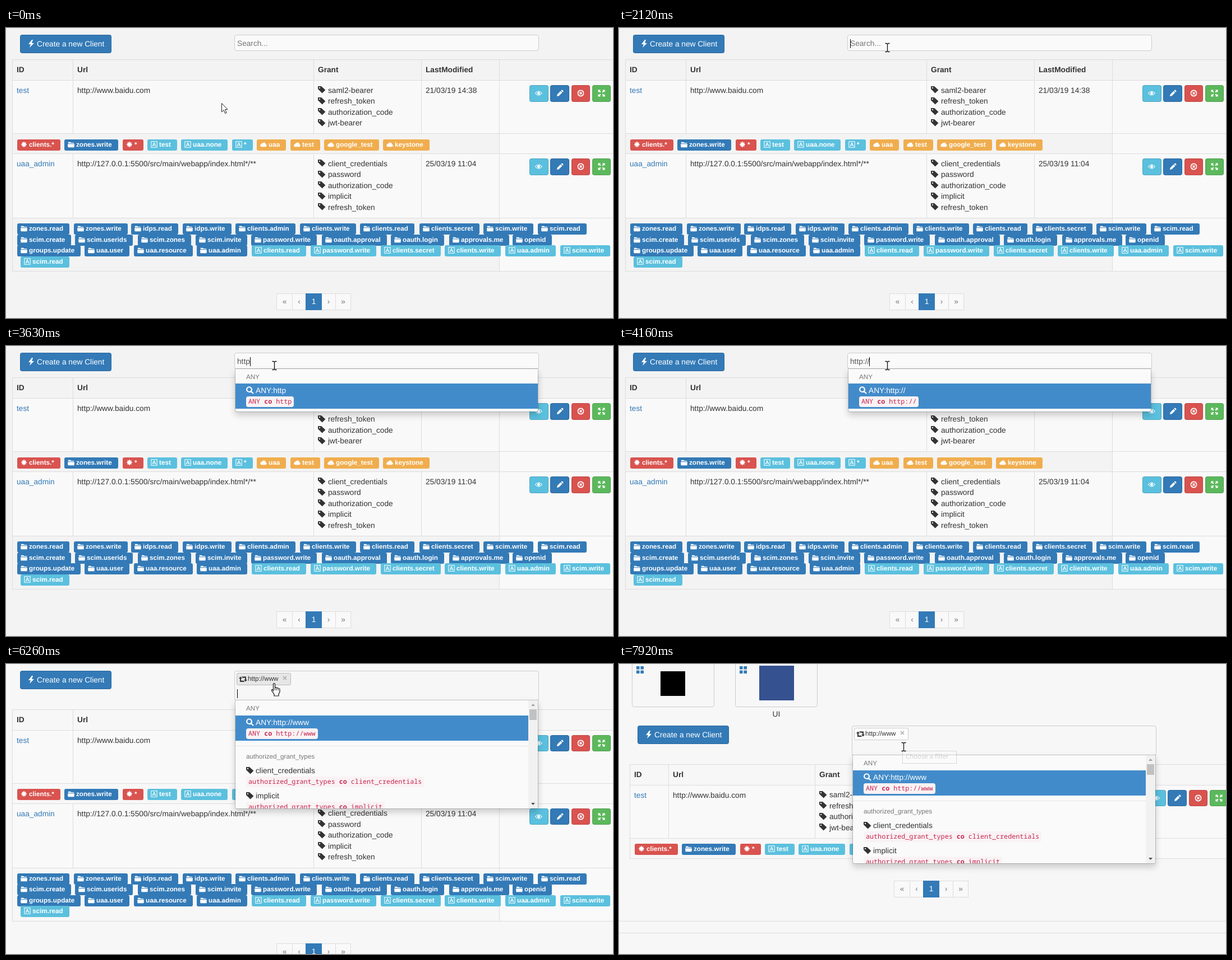
An HTML page for the animation above (8000 ms loop, 1082 by 518 pixels).

```html
<!DOCTYPE html>
<html lang="en">
<head>
<meta charset="utf-8">
<title>Client list search</title>
<style>
html, body { margin: 0; width: 100%; height: 100%; overflow: hidden; }
body { font: 13.7px/20px "Liberation Sans", Arial, sans-serif; color: #333; text-rendering: geometricPrecision; }
div, svg { box-sizing: border-box; }
#stage { position: relative; width: 1082px; height: 518px; overflow: hidden; background: #f3f3f3; }
#stage.chosen { background: #f7f7f7; }
#page { position: absolute; left: 0; top: 0; width: 1082px; height: 518px; --dy: 0px; }
.chosen #page { --dy: 24.5px; }
.filtered #page { left: 8px; top: 98px; }
#lower { left: 0; top: var(--dy); }
#page div, #extras, #extras div, #tip, #cursor { position: absolute; white-space: pre; }
svg { position: absolute; overflow: visible; }
.link { color: #337ab7; }
.cell { border: solid #ddd; border-width: 1px 0 0 1px; }
.odd { background: #f9f9f9; }
.btn { border-radius: 4px; border: 1px solid rgba(0, 0, 0, .13); color: #fff; }
#create { left: 25px; top: 12px; width: 163px; height: 33px; }
.label { height: 20px; line-height: 19px; padding: 0 11px 0 21px; border-radius: 3px; color: #fff; font-size: 11.7px; font-weight: bold; }
.primary { background: #337ab7; }
.info { background: #5bc0de; }
.danger { background: #d9534f; }
.warning { background: #f0ad4e; }
.success { background: #5cb85c; }
.pg { line-height: 28px; text-align: center; border: 1px solid #ddd; background: #f9f9f9; color: #777; }
.pg.on { z-index: 1; background: #337ab7; border-color: #337ab7; color: #fff; }
#search { left: 407px; top: 12px; width: 543px; height: calc(29px + var(--dy)); border: 1px solid #ccc; border-radius: 4px; background: #fafafa; color: #555; }
.chosen #search { background: #f7f7f7; }
#query { left: 4px; top: calc(5px + var(--dy)); height: 20px; }
#hint { left: 4px; top: 5px; color: #777; }
#caret { position: absolute; top: 2px; width: 1px; height: 16px; background: #000; }
#chip { left: 3px; top: 3px; width: 97px; height: 22px; border: 1px solid #bbb; border-radius: 3px; background: #e6e6e6; color: #333; font-size: 11.7px; }
.filtered #chip { background: #fcfcfc; border-color: #ccc; }
#list { left: 408px; top: calc(39.5px + var(--dy)); width: 541px; overflow: hidden; border: 1px solid rgba(0, 0, 0, .18); border-radius: 0 0 4px 4px; background: #fafafa; background-clip: padding-box; box-shadow: 0 6px 12px rgba(0, 0, 0, .175); }
#list .head { font-size: 11.7px; color: #777; }
#list .on { background: #428bca; color: #fff; }
.code { left: 19px; top: 23px; height: 19px; padding: 0 4px; line-height: 18px; border-radius: 4px; background: #f9f2f4; color: #c7254e; font-family: "Noto Sans Mono", "DejaVu Sans Mono", monospace; font-size: 11.72px; }
.card { border: 1px solid #ccc; border-radius: 4px; }
.panel { border: 1px solid #ddd; border-radius: 4px; }
#tip { left: 505px; top: 155px; width: 97px; height: 23px; padding-left: 5px; border: 1px solid #767676; background: #fff; color: #575757; font: 11.4px/20px "Open Sans", sans-serif; opacity: .25; }
</style>
</head>
<body>
<div id="stage">
  <div id="page">
    <div id="create" class="btn primary"></div>
    <div id="lower"></div>
    <div id="search"><div id="hint">Search...</div><div id="chip"></div><div id="query"></div></div>
    <div id="list"></div>
  </div>
  <div id="extras"></div>
  <div id="tip"></div>
  <svg id="cursor" width="20" height="26"></svg>
</div>
<script>
const $ = id => document.getElementById(id);

// 14-unit icons: f = filled path, s = stroked path
const ICONS = {
  flash: { f: 'M8 0 2 8h4l-2 6 8-8H8l2-6z' },
  tag: { f: 'M0 1v5l7.6 7.6 5.8-5.8L6 1zM3 2.7a1.2 1.2 0 1 1-.01 0z' },
  star: { s: 'M7 1.5v11M1.5 7h11M3.2 3.2l7.6 7.6M10.8 3.2l-7.6 7.6', w: 2.3 },
  folder: { f: 'M1 2h5l1 1.5h6V5H1zM0 6h14l-.6 7H.6z' },
  font: { f: 'M3 10.5h3v-.8h-.8l.5-1.4h2.7l.5 1.4H8v.8h3.2v-.8h-.7L7.7 3H6.3L3.7 9.7H3zM6 7.4l1-2.9 1 2.9z', s: 'M1 1h12v12H1z', w: 1.2 },
  cloud: { f: 'M3 12a3 3 0 0 1-.5-5.9A2.2 2.2 0 0 1 5 4.3a3.7 3.7 0 0 1 6.6 2A2.9 2.9 0 0 1 11 12z' },
  eye: { f: 'M7 4.3a2.7 2.7 0 1 1-.01 0z', s: 'M.6 7Q7-.5 13.4 7 7 14.5.6 7z', w: 1.2 },
  pencil: { f: 'M1 13l.9-3.9 6.3-6.3 3 3-6.3 6.3zM9 2l1.3-1.3q.7-.5 1.4 0l1.6 1.6q.5.7 0 1.4L12 5z' },
  remove: { s: 'M7 1.5a5.5 5.5 0 1 1-.01 0zM5 5l4 4M9 5l-4 4', w: 1.9 },
  expand: { f: 'M.5.5h5L3.9 2.1 6 4.2 4.2 6 2.1 3.9.5 5.5zM13.5.5v5l-1.6-1.6L9.8 6 8 4.2l2.1-2.1L8.5.5zM.5 13.5v-5l1.6 1.6L4.2 8 6 9.8l-2.1 2.1 1.6 1.6zM13.5 13.5h-5l1.6-1.6L8 9.8 9.8 8l2.1 2.1 1.6-1.6z' },
  search: { s: 'M5.5 1.2a4.4 4.4 0 1 1-.01 0zM9 9l4 4', w: 2.1 },
  retweet: { f: 'M0 6l3-3.5L6 6H4v3.8h4.5l2 2.2H2V6zM4.8 2.5H13V8h2l-3 3.5L9 8h2V4.7H6.8z' },
  grid: { f: 'M0 0h6v6H0zM8 0h6v6H8zM0 8h6v6H0zM8 8h6v6H8z' }
};

function icon(name, size, x, y) {
  const { f, s, w } = ICONS[name];
  return `<svg viewBox="0 0 14 14" width="${size}" height="${size}" style="left:${x}px;top:${y}px">` +
    (f ? `<path d="${f}" fill="currentColor" fill-rule="evenodd"/>` : '') +
    (s ? `<path d="${s}" fill="none" stroke="currentColor" stroke-width="${w}"/>` : '') + '</svg>';
}
const box = (x, y, w, h, cls, html = '') =>
  `<div class="${cls}" style="left:${x}px;top:${y}px;width:${w}px;height:${h}px">${html}</div>`;
// text with its line centred on cy
const text = (x, cy, str, cls = '') =>
  `<div class="${cls}" style="left:${x}px;top:${cy - 10}px">${str}</div>`;

const KINDS = { D: ['danger', 'star'], P: ['primary', 'folder'], I: ['info', 'font'], W: ['warning', 'cloud'] };

// "kind x name" entries, separated by commas
function labels(y, list) {
  return list.split(',').map(entry => {
    const [kind, x, name] = entry.split(' ');
    const [cls, glyph] = KINDS[kind];
    return `<div class="label ${cls}" style="left:${x}px;top:${y}px">${icon(glyph, 12, 6, 3)}${name}</div>`;
  }).join('');
}

const TEST_LABELS = labels(198.5, 'D 20 clients.*,P 104 zones.write,D 208 *,I 252 test,I 312 uaa.none,I 403 *,W 447 uaa,W 507 test,W 567 google_test,W 672 keystone');
const ADMIN_LABELS = [
  'P 20 zones.read,P 121 zones.write,P 223 idps.read,P 315 idps.write,P 409 clients.admin,P 524 clients.write,P 631 clients.read,P 737 clients.secret,P 851 scim.write,P 948 scim.read',
  'P 20 scim.create,P 123 scim.userids,P 235 scim.zones,P 338 scim.invite,P 437 password.write,P 563 oauth.approval,P 686 oauth.login,P 790 approvals.me,P 903 openid',
  'P 20 groups.update,P 140 uaa.user,P 228 uaa.resource,P 340 uaa.admin,I 438 clients.read,I 543 password.write,I 668 clients.secret,I 782 clients.write,I 890 uaa.admin,I 988 scim.write',
  'I 26 scim.read'
].map((line, i) => labels(349 + i * 19.6, line)).join('');

function cells(cols, y, h, cls) {
  return cols.map((x, i) => box(x, y, (cols[i + 1] || 1100) - x, h, 'cell ' + cls)).join('');
}

// label row: one wide cell and a lighter one under the buttons
const labelRow = (x, split, y, h) =>
  box(x, y, split - x, h, 'cell') + box(split, y, 1100 - split, h, 'cell odd');

function actions(y) {
  const kinds = [['info', 'eye'], ['primary', 'pencil'], ['danger', 'remove'], ['success', 'expand']];
  return kinds.map(([cls, glyph], i) =>
    box(933 + i * 37.3, y, 33.5, 29.5, 'btn ' + cls, icon(glyph, 13, 9.3, 7))).join('');
}

function client(cols, y, id, url, grants, date) {
  return text(19, y + 19, id, 'link') + text(cols[1] + 8, y + 19, url) +
    grants.split(' ').map((g, i) => {
      const cy = y + 18.7 + i * 19.5;
      return icon('tag', 14, cols[2] + 8, cy - 8.5) + text(cols[2] + 26, cy, g);
    }).join('') + text(cols[3] + 8, y + 19, date) + actions(y + 9);
}

function lower(filtered) {
  const cols = filtered ? [11, 80, 341, 540, 690] : [11, 119, 548, 740, 879];
  const end = filtered ? 224 : 434;
  let html = cells(cols, 56, 37, '') + cells(cols, 93, 95, 'odd') + labelRow(11, cols[4], 188, 36);
  ['ID', 'Url', 'Grant', 'LastModified'].forEach((name, i) => html += text(cols[i] + 8, 75, `<b>${name}</b>`));
  html += client(cols, 93, 'test', 'http://www.baidu.com',
    'saml2-bearer refresh_token authorization_code jwt-bearer', '21/03/19 14:38') + TEST_LABELS;
  if (!filtered) {
    html += cells(cols, 224, 115, 'odd') + labelRow(11, cols[4], 339, 95) +
      client(cols, 224, 'uaa_admin', 'http://127.0.0.1:5500/src/main/webapp/index.html*/**',
        'client_credentials password authorization_code implicit refresh_token', '25/03/19 11:04') + ADMIN_LABELS;
  }
  html += box(11, end, 1089, 1, 'cell');
  const edges = [482, 510, 534, 562, 587, 614];
  ['«', '‹', '1', '›', '»'].forEach((c, i) =>
    html += box(edges[i], end + 40, edges[i + 1] - edges[i] + 1, 30, i === 2 ? 'pg on' : 'pg', c));
  return html;
}

function item(y, w, glyph, title, field, value, on) {
  return box(0, y, w, 45, on ? 'on' : '', icon(glyph, 14, 19, 5) + text(36, 13, title) +
    `<div class="code">${field} <b>co</b> ${value}</div>`);
}

// kinds: 'full' scrolls, 'any' has one entry, 'uri' adds the redirect match
function list(kind, term, second) {
  const w = kind === 'full' ? 522 : 539;
  let html = text(19, 15, 'ANY', 'head') +
    item(26.5, w, 'search', 'ANY:' + term, 'ANY', term, !second);
  if (kind === 'any') return html;
  html += `<div style="left:0;top:81px;width:${w}px;height:1px;background:#e5e5e5"></div>`;
  if (kind === 'uri') {
    return html + text(19, 101, 'web_server_redirect_uri', 'head') +
      item(112.5, w, 'retweet', term, 'web_server_redirect_uri', term, second);
  }
  html += text(19, 101, 'authorized_grant_types', 'head');
  ['client_credentials', 'implicit'].forEach((g, i) =>
    html += item(112.5 + i * 45, w, 'tag', g, 'authorized_grant_types', g));
  return html + `<svg width="17" height="193" style="left:522px;top:0"><path fill="#f1f1f1" d="M0 0h17v193H0z"/>
    <path fill="#c1c1c1" d="M2 16h13v19H2z"/><path fill="#a3a3a3" d="M5 10l3.5-4 3.5 4z"/><path fill="#505050" d="M5 183l3.5 4 3.5-4z"/></svg>`;
}
const LIST_HEIGHT = { full: 195, any: 78, uri: 165 };

// drawn around the hot spot
const CURSORS = {
  arrow: '<path d="M.5.5V16l3.6-3.5 2.5 6 2.5-1-2.5-5.9H11z" fill="#fff" stroke="#222"/>',
  beam: '<path d="M-3.5-6.5H-1l1.5 1 1.5-1h2.5M.5-5.5v14M-3.5 8.5H-1l1.5-1 1.5 1h2.5" fill="none" stroke="#111" stroke-width="1.3"/>',
  hand: '<path d="M-1.5 1.5q1.5-2 3 0v7q2-1.5 3 .5 2-1 2.7.7 2-.7 2.8 1V16l-2 3.500v3.500h-8v-3l-4.500-6.500q-.5-2 1.500-1.800l1.500 2z" fill="#fff" stroke="#111" stroke-width="1.2"/><path d="M1.5 9v4M4.5 10v3M7.5 11v2" stroke="#111"/>'
};

const at = (x, y, cursor) => ({ x, y, cursor });
const typed = (term, kind) => ({ term, kind, caret: true });

// each entry changes the state from its time on
const STEPS = [
  [0, { ...at(384, 134, 'arrow'), term: '', kind: '', caret: false, second: false, chosen: false, filtered: false, tip: 0 }],
  [530, at(330, 119, 'arrow')], [680, at(240, 98, 'arrow')], [820, at(166, 79, 'arrow')], [970, at(130, 70, 'beam')],
  [1250, at(150, 66, 'arrow')], [1380, at(205, 58, 'arrow')], [1510, at(275, 50, 'arrow')],
  [1640, at(350, 44, 'arrow')], [1770, at(425, 37, 'beam')], [1900, at(478, 34, 'beam')],
  [2120, { caret: true }], [2280, { kind: 'full' }], [2680, { caret: false }],
  [2960, typed('h', 'full')], [3100, typed('ht', 'full')], [3240, typed('htt', 'any')], [3390, typed('http', 'any')],
  [3880, typed('http:', 'any')], [4030, typed('http:/', 'any')], [4160, typed('http://', 'any')],
  [4290, typed('http://w', 'any')], [4420, typed('http://ww', 'any')], [4560, typed('http://www', 'uri')],
  [5080, { second: true, caret: false }], [5610, { caret: true }],
  [6110, { chosen: true, second: false, kind: 'full' }], [6260, at(478, 34, 'hand')],
  [6400, { filtered: true }], [6530, at(478, 34, 'arrow')],
  [6830, { ...at(485, 60, 'arrow'), caret: false }], [6970, at(493, 95, 'arrow')], [7110, at(501, 122, 'hand')],
  [7250, at(507, 147, 'beam')], [7400, { caret: true }], [7800, { caret: false, tip: 1 }], [7920, { tip: 2 }]
];
const LOOP = 8000;
let state = {};
const STATES = STEPS.map(([, change]) => state = { ...state, ...change });

$('create').innerHTML = icon('flash', 14, 12, 8) + text(29, 15.5, 'Create a new Client');
$('chip').innerHTML = icon('retweet', 14, 3, 3) + text(19, 10, 'http://www') +
  '<svg width="8" height="8" style="left:81px;top:4px"><path d="M1 1l6 6M7 1l-6 6" stroke="#aaa" stroke-width="1.5"/></svg>';
$('extras').innerHTML = box(23, -20, 147, 97, 'card') + box(207, -20, 147, 97, 'card') +
  `<div class="link">${icon('grid', 13, 31, 4) + icon('grid', 13, 215, 4)}</div>` +
  '<div style="left:74px;top:13px;width:44px;height:44px;background:#000"></div>' +
  '<div style="left:250px;top:3px;width:62px;height:62px;background:#35518f"></div>' +
  text(273.5, 90, 'UI') + box(-1, -50, 1100, 510, 'panel') + box(-1, 480, 1100, 100, 'panel');

function show(s) {
  $('stage').className = (s.chosen ? 'chosen ' : '') + (s.filtered ? 'filtered' : '');
  $('lower').innerHTML = lower(s.filtered);
  $('hint').hidden = s.term !== '' || s.chosen;
  $('chip').hidden = !s.chosen;
  $('query').innerHTML = (s.chosen ? '' : s.term) + (s.caret ? '<span id="caret"></span>' : '');
  $('list').hidden = !s.kind;
  $('list').style.height = (LIST_HEIGHT[s.kind] || 0) + 'px';
  $('list').innerHTML = s.kind ? list(s.kind, s.term, s.second) : '';
  $('extras').hidden = !s.filtered;
  $('tip').hidden = !s.tip;
  $('tip').textContent = s.tip > 1 ? 'Choose a filter' : '';
  $('cursor').style.left = s.x + 'px';
  $('cursor').style.top = s.y + 'px';
  $('cursor').innerHTML = CURSORS[s.cursor];
}

const start = performance.now();
let shown = -1;
function tick() {
  const t = (performance.now() - start) % LOOP;
  const index = STEPS.filter(([time]) => time <= t).length - 1;
  if (index !== shown) show(STATES[shown = index]);
  requestAnimationFrame(tick);
}
tick();
</script>
</body>
</html>
```
